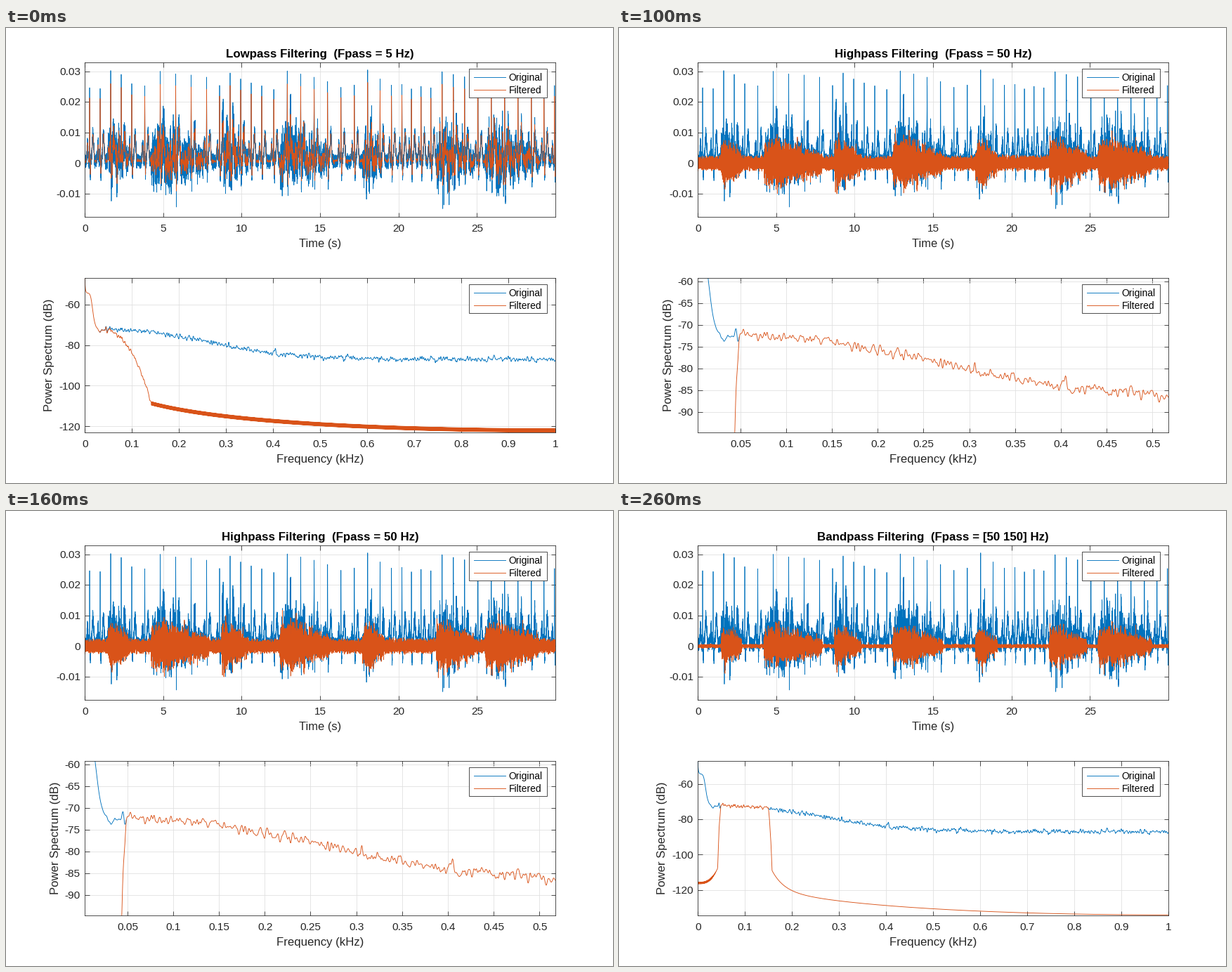
A matplotlib script that plays this animation: 864x648 px, repeating every 300 ms.

```python
import numpy as np
import matplotlib.pyplot as plt
from matplotlib.animation import FuncAnimation
from matplotlib.patches import Rectangle

W, H = 864, 648
BLUE, RUST, INK, GRID = "#0072BD", "#D95319", "#262626", "#dfdfdf"
LEFT, RIGHT = 112, 782
TOP_BOX, LOW_BOX = (49, 269), (356, 576)

plt.rcParams["font.family"] = "Liberation Sans"
plt.rcParams["agg.path.chunksize"] = 10000
rng = np.random.default_rng(5)


# ---- time signal: heartbeats with bursts of muscle noise ----
FS, SPAN = 1000, 30
t = np.arange(SPAN * FS) / FS
BURSTS = [(1.5, 2.8), (4.2, 7.9), (8.7, 10.4), (12.4, 15.6),
          (17.7, 19.1), (22.4, 24.8), (25.5, 28.9)]


def bump(center, width):
    return np.exp(-((t - center) / width) ** 2)


def smooth(x, n):
    y = np.convolve(x, np.hanning(n + 2), "same")
    return y / y.std()


# sudden onset, swell, then a long taper
env = np.zeros(t.size)
for a, b in BURSTS:
    env += np.interp((t - a) / (b - a), [0, 0.02, 0.25, 1, 1.02], [0, 0.85, 1, 0.3, 0])

# the pulse speeds up and slows down: beat number against gap in pixels
gaps = np.interp(np.arange(38),
                 [0, 3, 5, 8, 10, 13, 15, 21, 25, 27, 28, 30, 31, 35, 36, 37],
                 [15, 15, 22, 22, 15, 15, 19.2, 19, 13.5, 14, 16, 16, 19, 19, 18, 15])
beats = (7 + np.append(0, np.cumsum(gaps))) * SPAN / (RIGHT - LEFT)

waves = np.full(t.size, 0.0006)
qrs = np.zeros(t.size)
calm = np.ones(t.size)
for b in beats:
    peak = 0.0246 + 0.0055 * np.interp(b, t, env) + rng.normal(0, 0.0006)
    waves += 0.0055 * bump(b - 0.135, 0.045) + 0.009 * bump(b + 0.21, 0.065)
    qrs += peak * bump(b, 0.013) - 0.0052 * bump(b + 0.045, 0.014)
    calm -= 0.95 * bump(b, 0.014)

slow = smooth(rng.normal(size=t.size), 25) * (0.0003 + 0.0026 * env)
mid = smooth(rng.normal(size=t.size), 3) * (0.00025 + 0.0023 * env)
hiss = (np.clip(rng.normal(size=t.size), -2.6, 2.6) * 0.0009
        + rng.standard_t(12, t.size) * 0.0014 * env)

raw = waves + qrs + calm * (slow + mid + hiss)
low = waves + 0.86 * qrs + calm * slow
high = mid + hiss
band = mid


# ---- power spectra in dB, frequency in kHz ----
f = np.linspace(0, 1, 2001)
zigzag = np.where(np.arange(f.size) % 2, 1.0, -1.0)
log_sin = np.log(np.sin(np.pi / 2 * np.maximum(f, 1e-4)))


def fade(start, width):
    return np.clip((f - start) / width, 0, 1)


def edge(gap, width):
    """Steep filter edge: 24 dB down at one width past the corner."""
    return 24 * (np.maximum(gap, 0) / width) ** 1.5


spec = (-87 + 16 / (1 + np.exp((f - 0.275) / 0.085))
        + 17.2 / (1 + (f / 0.0172) ** 7)
        + 8 * np.exp(-f / 0.0012)
        - 1.3 * np.exp(-((f - 0.033) / 0.009) ** 2)
        + 0.62 * smooth(rng.normal(size=f.size), 7) * fade(0.022, 0.01))

roll = 11 * (np.maximum(f - 0.03, 0) / 0.07) ** 2.5
low_floor = -122 - 8.8 * log_sin + 0.85 * zigzag * fade(0.136, 0.006)
low_spec = np.where(f < 0.142, spec - roll, low_floor)

high_spec = spec - edge(0.0492 - f, 0.0053)

left_skirt = -116 + 8 * (f / 0.0418) ** 3 + 0.5 * zigzag * (1 - fade(0.03, 0.012))
right_skirt = -134 - 10 * log_sin + 11 * np.exp(-(f - 0.158) / 0.025)
band_spec = np.maximum(high_spec - edge(f - 0.15, 0.0063),
                       np.where(f < 0.1, np.minimum(left_skirt, -100), right_skirt))
band_spec = np.where((f > 0.0492) & (f < 0.15), spec, band_spec)


# ---- drawing ----
fig = plt.figure(figsize=(W / 72, H / 72), dpi=72, facecolor="white")
page = fig.add_axes([0, 0, 1, 1], zorder=5)
page.set(xlim=(0, W), ylim=(H, 0))
page.axis("off")


def put(x, y, s, size=15.4, ha="center", **kw):
    kw.setdefault("color", INK)
    return page.text(x, y, s, fontsize=size, ha=ha, va="baseline", **kw)


def panel(box, xlim, ylim, xticks, yticks):
    """Axes inside a pixel box; returns the axes and its tick labels."""
    y0, y1 = box
    ax = fig.add_axes([LEFT / W, 1 - y1 / H, (RIGHT - LEFT) / W, (y1 - y0) / H])
    ax.set(xlim=xlim, ylim=ylim, xticks=xticks, yticks=yticks)
    ax.set_axisbelow(True)
    ax.grid(color=GRID, lw=0.8)
    ax.tick_params(direction="in", length=6.5, width=0.8, color=INK, top=True,
                   right=True, labelbottom=False, labelleft=False)
    for side in ax.spines.values():
        side.set(color=INK, linewidth=0.8)
    texts = []
    for v in xticks:
        x = LEFT + (v - xlim[0]) / (xlim[1] - xlim[0]) * (RIGHT - LEFT)
        texts.append(put(x + 0.5, y1 + 21, f"{v:g}"))
    for v in yticks:
        y = y1 - (v - ylim[0]) / (ylim[1] - ylim[0]) * (y1 - y0)
        texts.append(put(106, y + 5.2, f"{v:g}", ha="right"))
    return ax, texts


def legend(y):
    page.add_patch(Rectangle((659, y), 111, 41, fc="white", ec=INK, lw=0.8))
    for dy, name, color in ((12, "Original", BLUE), (30, "Filtered", RUST)):
        page.plot([666, 711], [y + dy] * 2, color=color, lw=0.9)
        put(715.5, y + dy + 4.6, name, 13.9, "left", color="black")


top, _ = panel(TOP_BOX, (0, SPAN), (-0.01755, 0.0329), range(0, SPAN, 5),
               [-0.01, 0, 0.01, 0.02, 0.03])
top.plot(t, raw, color=BLUE, lw=0.75)
legend(58)
legend(365)
put(447, 312, "Time (s)", 16.5)
put(447.5, 618.5, "Frequency (kHz)", 16.7)

tenths = np.arange(11) / 10
SCENES = [
    ("Lowpass Filtering  (Fpass = 5 Hz)", low, low_spec, 66,
     (0, 1), (-123, -47), tenths, range(-120, -50, 20)),
    ("Highpass Filtering  (Fpass = 50 Hz)", high, high_spec, 74.5,
     (.0036, .5173), (-94.7, -59.15), np.arange(1, 11) / 20, range(-90, -59, 5)),
    ("Bandpass Filtering  (Fpass = [50 150] Hz)", band, band_spec, 66,
     (0, 1), (-134.3, -47.1), tenths, range(-120, -50, 20)),
]


def build(title, signal, power, label_x, xlim, ylim, xticks, yticks):
    ax, parts = panel(LOW_BOX, xlim, ylim, xticks, yticks)
    # leave out the part hidden under the filtered curve
    ax.plot(f, np.where(np.isclose(power, spec), np.nan, spec), color=BLUE, lw=0.9)
    ax.plot(f, power, color=RUST, lw=0.9)
    parts += top.plot(t, signal, color=RUST, lw=0.75)
    parts.append(put(447, 42, title, 16.9, weight="bold", color="black"))
    parts.append(put(label_x, 466, "Power Spectrum (dB)", 16.8,
                     rotation=90, rotation_mode="anchor"))
    return [ax] + parts


scenes = [build(*s) for s in SCENES]


def show(i):
    for k, parts in enumerate(scenes):
        for part in parts:
            part.set_visible(k == i)
    return []


anim = FuncAnimation(fig, show, frames=3, interval=100, repeat=True,
                     repeat_delay=0, init_func=lambda: show(0))
plt.show()
```
